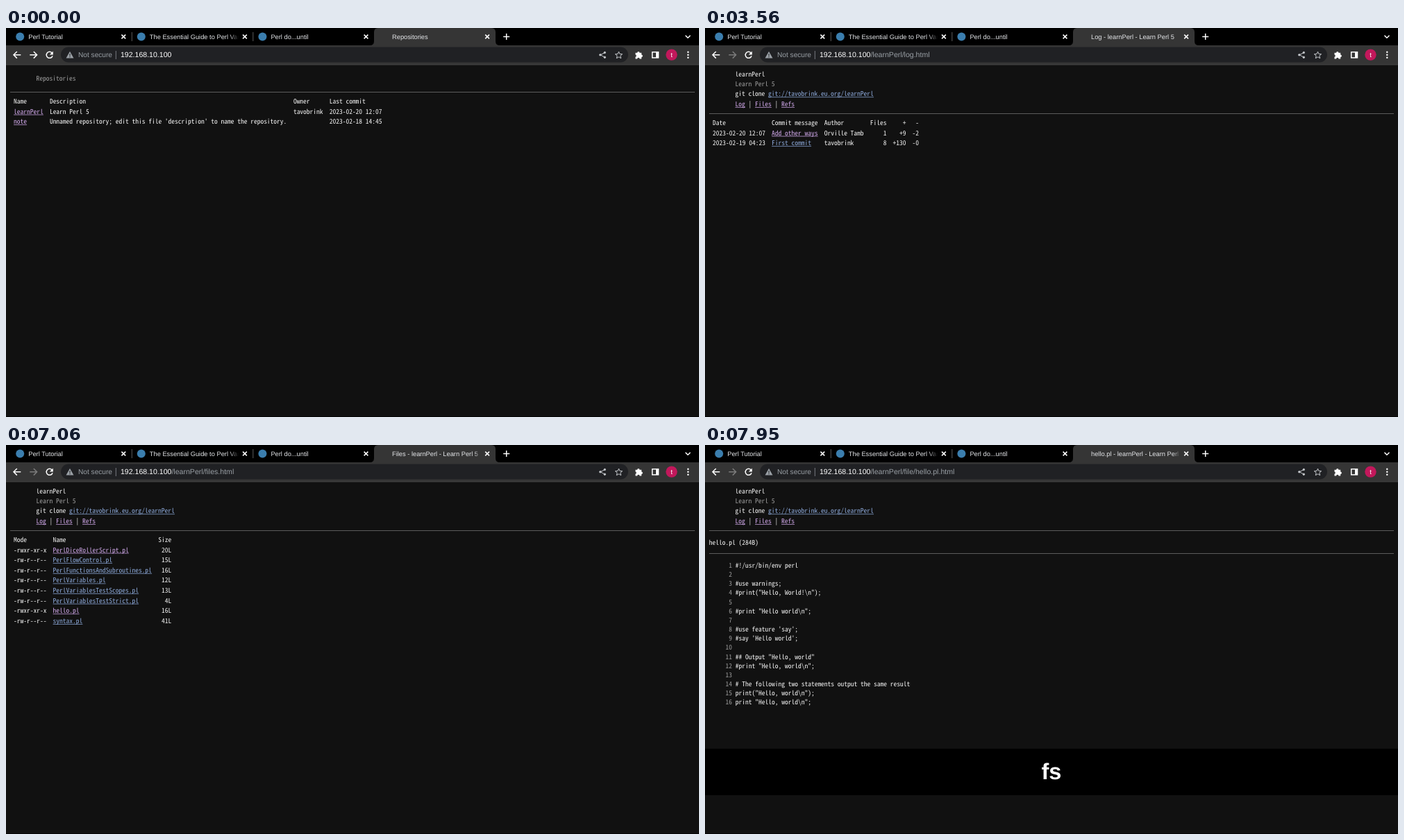
Recreate the animation shown at these times as an HTML page. Size 998x561 px, loop 9850 ms.

```html
<!DOCTYPE html>
<html lang="en">
<head>
<meta charset="utf-8">
<title>Link hints</title>
<style>
html, body { margin: 0; width: 100%; height: 100%; overflow: hidden; background: #000; }
svg { display: block; width: 100vw; height: 100vh; }
text { font-family: "Liberation Sans", Arial, sans-serif; fill: #fff; white-space: pre; text-rendering: geometricPrecision; }
.tab { font-size: 9.3px; fill: #e4e6e9; }
.url { font-size: 10.57px; }
.mono { font-family: "Noto Sans Mono CJK SC", "Noto Sans Mono CJK JP", "Noto Sans Mono", monospace; fill: #f5f5f5; }
.dim { fill: #9c9c9c; }
.link { fill: #8ca9da; }
.seen { fill: #d0a8ea; }
.hint { font-size: 8px; font-weight: bold; fill: #302505; text-anchor: middle; }
.keys { font-size: 32.5px; font-weight: bold; text-anchor: middle; }
.icon { fill: none; stroke: #fff; stroke-width: 1.5; }
</style>
</head>
<body>
<svg id="stage" viewBox="0 0 998 561">
  <defs>
    <linearGradient id="gold" x2="0" y2="1">
      <stop stop-color="#fff785"/><stop offset="1" stop-color="#ffc542"/>
    </linearGradient>
    <linearGradient id="fade1" gradientUnits="userSpaceOnUse" x1="322" x2="335">
      <stop stop-color="#e4e6e9"/><stop offset="1" stop-color="#e4e6e9" stop-opacity="0"/>
    </linearGradient>
    <linearGradient id="fade2" gradientUnits="userSpaceOnUse" x1="675" x2="684">
      <stop stop-color="#e4e6e9"/><stop offset="1" stop-color="#e4e6e9" stop-opacity="0"/>
    </linearGradient>
  </defs>
  <rect width="998" height="561"/>
  <rect y="25" width="998" height="28" fill="#353535"/>
  <path d="M524 25q6 0 6-6V6q0-6 6-6h163q6 0 6 6v13q0 6 6 6z" fill="#353535"/>
  <path d="M181.3 6v13M355.8 6v13" stroke="#5a5a5a"/>
  <g id="tabs"></g>
  <path class="icon" d="M716.2 12.5h9M720.7 8v9M978.5 10.8l3.5 3.4 3.5-3.4"/>
  <rect x="79" y="27.5" width="817" height="22" rx="11" fill="#202124"/>
  <path class="icon" d="M21.3 38.8H11M15.8 34l-4.8 4.8 4.8 4.8"/>
  <path class="icon" id="forward" d="M34.3 38.8h10.3M39.8 34l4.8 4.8-4.8 4.8"/>
  <path class="icon" d="M66.2 36a4.5 4.5 0 1 0 .8 4.2"/>
  <path d="M67.8 33.4v5h-5z" fill="#fff"/>
  <path d="M92 33.8l5.5 9.6h-11z" fill="#9aa0a6"/>
  <path d="M92 37.2v3M92 41v1.2" stroke="#202124" stroke-width="1.1"/>
  <text x="104" y="42.3" font-size="10.13" style="fill:#9aa0a6">Not secure</text>
  <path d="M158.3 33v12" stroke="#777b80"/>
  <text class="url" x="165" y="42.4">192.168.10.100<tspan id="path" fill="#9aa0a6"></tspan></text>
  <g fill="#c7cace" stroke="#c7cace">
    <path d="M862.3 35.6l-6.3 3.2 6.3 3.4" fill="none"/>
    <circle cx="862.3" cy="35.4" r="1.2"/><circle cx="855.8" cy="38.8" r="1.2"/><circle cx="862.3" cy="42.3" r="1.2"/>
  </g>
  <path d="M882.5 34l1.4 3.4 3.7.3-2.8 2.4.9 3.6-3.2-1.9-3.2 1.9.9-3.6-2.8-2.4 3.7-.3z" fill="none" stroke="#c7cace"/>
  <path d="M906.5 35.8h2.6a1.7 1.7 0 0 1 3.4 0h2.7v2.7a1.7 1.7 0 0 1 0 3.4v2.6h-2.7a1.7 1.7 0 0 0-3.4 0h-2.6v-2.7a1.7 1.7 0 0 0 0-3.3z" fill="#fff"/>
  <rect class="icon" x="930.7" y="34.7" width="8.8" height="8.2"/>
  <rect x="936" y="34.7" width="4" height="8.2" fill="#fff"/>
  <circle cx="958.5" cy="38.6" r="8.2" fill="#c2185b"/>
  <text x="958.5" y="41.7" font-size="9.5" text-anchor="middle">t</text>
  <g fill="#fff"><circle cx="982.3" cy="34.8" r="1.2"/><circle cx="982.3" cy="38.8" r="1.2"/><circle cx="982.3" cy="42.8" r="1.2"/></g>
  <rect y="53" width="998" height="507.3" fill="#111"/>
  <rect y="52.6" width="998" height=".8" fill="#4b4b4b"/>
  <g id="pages"></g>
  <g id="hud">
    <rect x="660.5" y="538.4" width="315" height="30" rx="3" fill="#202124" stroke="#4a4b4e" stroke-width=".7"/>
    <text x="666" y="553" font-size="10.2">Open link in current tab</text>
  </g>
  <g id="band">
    <rect y="438" width="998" height="67"/>
    <text class="keys" id="keys" x="499" y="482"></text>
    <rect id="recent" y="489" height="2" fill="#fff"/>
  </g>
</svg>
<script>
const LOOP = 9850;
const SCALE = 998 / 1366;
const CHAR = 6.5 * SCALE;
const ROW = 20 * SCALE;
const CODE_ROW = 18 * SCALE;
const $ = id => document.getElementById(id);

function add(parent, tag, attrs, content) {
  const node = document.createElementNS("http://www.w3.org/2000/svg", tag);
  for (const name in attrs) node.setAttribute(name, attrs[name]);
  if (content !== undefined) node.textContent = content;
  return parent.appendChild(node);
}

// Pick the monospaced font size that gives the wanted advance.
const probe = add($("stage"), "text", { class: "mono", "font-size": 100 }, "0000000000");
const monoSize = CHAR * 1000 / probe.getComputedTextLength();
probe.remove();

function mono(group, x, middle, text, kind = "", right = false) {
  if (right) x -= text.length * CHAR;
  add(group, "text", { class: "mono " + kind, x, y: middle + 3.5, "font-size": monoSize }, text);
}

function link(group, x, middle, text, kind = "seen") {
  mono(group, x, middle, text, kind);
  add(group, "rect", { class: kind, x, y: middle + 4.6, width: text.length * CHAR, height: SCALE });
  group.links.push([x, middle - 6]);
}

const rule = (group, y) => add(group, "rect", { x: 6, y, width: 986, height: 1, fill: "#5c5c5c" });

function repoHeader(group) {
  const left = 43.54;
  group.links.push([11, 67]);
  mono(group, left, 66.9, "learnPerl");
  mono(group, left, 80.1, "Learn Perl 5", "dim");
  mono(group, left, 94.8, "git clone");
  link(group, left + 10 * CHAR, 94.8, "git://tavobrink.eu.org/learnPerl", "link");
  link(group, left, 109.4, "Log");
  mono(group, left + 4 * CHAR, 109.4, "|");
  link(group, left + 6 * CHAR, 109.4, "Files");
  mono(group, left + 12 * CHAR, 109.4, "|");
  link(group, left + 14 * CHAR, 109.4, "Refs");
  rule(group, 123);
}

function indexPage(g) {
  mono(g, 43.54, 72, "Repositories", "dim");
  rule(g, 92);
  const columns = [11.1, 62.9, 413.9, 465.7];
  [["Name", "Description", "Owner", "Last commit"],
   ["learnPerl", "Learn Perl 5", "tavobrink", "2023-02-20 12:07"],
   ["note", "Unnamed repository; edit this file 'description' to name the repository.", "", "2023-02-18 14:45"]
  ].forEach((row, r) => row.forEach((cell, c) =>
    (r && !c ? link : mono)(g, columns[c], 105.5 + ROW * r, cell)));
}

function logPage(g) {
  repoHeader(g);
  const columns = [11.1, 96.1, 171.7, 261.5, 289.5, 308.1];
  [["Date", "Commit message", "Author", "Files", "+", "-"],
   ["2023-02-20 12:07", "Add other ways", "Orville Tamb", "1", "+9", "-2"],
   ["2023-02-19 04:23", "First commit", "tavobrink", "8", "+130", "-0"]
  ].forEach((row, r) => row.forEach((cell, c) => {
    const y = 136.5 + ROW * r;
    if (r && c === 1) link(g, columns[c], y, cell, r === 1 ? "seen" : "link");
    else mono(g, columns[c], y, cell, "", c > 2);
  }));
}

function filesPage(g) {
  repoHeader(g);
  mono(g, 11.1, 136.5, "Mode");
  mono(g, 67.6, 136.5, "Name");
  mono(g, 238.2, 136.5, "Size", "", true);
  [["PerlDiceRollerScript", 20, true], ["PerlFlowControl", 15], ["PerlFunctionsAndSubroutines", 16],
   ["PerlVariables", 12], ["PerlVariablesTestScopes", 13], ["PerlVariablesTestStrict", 4],
   ["hello", 16, true], ["syntax", 41]
  ].forEach(([name, lines, run], i) => {
    const y = 136.5 + ROW * (i + 1);
    mono(g, 11.1, y, run ? "-rwxr-xr-x" : "-rw-r--r--");
    link(g, 67.6, y, name + ".pl", run ? "seen" : "link");
    mono(g, 238.2, y, lines + "L", "", true);
  });
}

function sourcePage(g) {
  repoHeader(g);
  mono(g, 5.85, 140, "hello.pl (284B)");
  rule(g, 156);
  String.raw`#!/usr/bin/env perl

#use warnings;
#print("Hello, World!\n");

#print "Hello world\n";

#use feature 'say';
#say 'Hello world';

## Output "Hello, world"
#print "Hello, world\n";

# The following two statements output the same result
print("Hello, world\n");
print "Hello, world\n";`.split("\n").forEach((line, i) => {
    const y = 173.5 + CODE_ROW * i;
    mono(g, 39.1, y, String(i + 1), "dim", true);
    mono(g, 43.84, y, line);
  });
}

function addHints(page) {
  const letters = [..."sadfjklewcmpgh"].slice(0, page.links.length).sort();
  const hints = add(page, "g", {});
  page.links.forEach(([x, y], i) => {
    add(hints, "rect", { x: x + 0.4, y: y + 0.4, width: 11.6, height: 10, rx: 2, fill: "url(#gold)", stroke: "#c38a22", "stroke-width": 0.7 });
    add(hints, "text", { class: "hint", x: x + 6.2, y: y + 8.3 }, letters[i].toUpperCase());
  });
  return hints;
}

const pages = [
  [indexPage, "Repositories", ""],
  [logPage, "Log - learnPerl - Learn Perl 5", "/learnPerl/log.html"],
  [filesPage, "Files - learnPerl - Learn Perl 5", "/learnPerl/files.html"],
  [sourcePage, "hello.pl - learnPerl - Learn Perl 5", "/learnPerl/file/hello.pl.html"]
].map(([draw, title, path]) => {
  const group = add($("pages"), "g", {});
  group.links = [];
  draw(group);
  return { group, title, path, hints: addHints(group) };
});

const tabTitles = ["Perl Tutorial", "The Essential Guide to Perl Vari", "Perl do...until", ""].map((title, i) => {
  const x = 20.2 + 174.6 * i;
  if (i < 3) add($("tabs"), "circle", { cx: x, cy: 12.5, r: 6, fill: "#3b7eae" });
  add($("tabs"), "path", { class: "icon", d: `M${x + 146.2} 9.6l5.8 5.8m0-5.8l-5.8 5.8` });
  const text = add($("tabs"), "text", { class: "tab", x: x + 12, y: 15.6 }, title);
  if (i % 2) text.style.fill = `url(#fade${(i + 1) / 2})`;
  return text;
});

// time, page, keys shown, last key underlined, hints shown, message opacity
const steps = [
  [0, 0, "", 0, 0, 0],
  [370, 0, "f", 1, 0, 0],
  [420, 0, "f", 1, 1, 0.35],
  [480, 0, "f", 0, 1, 0.75],
  [540, 0, "f", 0, 1, 1],
  [860, 0, "fa", 1, 1, 1],
  [910, 0, "fa", 1, 0, 0],
  [970, 1, "fa", 0, 0, 0],
  [3560, 1, "", 0, 0, 0],
  [3900, 1, "f", 1, 0, 0],
  [3950, 1, "f", 1, 1, 0.3],
  [4000, 1, "f", 0, 1, 0.6],
  [4050, 1, "f", 0, 1, 0.9],
  [4100, 1, "f", 0, 1, 1],
  [4370, 1, "fj", 1, 1, 1],
  [4420, 1, "fj", 1, 0, 0],
  [4480, 2, "fj", 0, 0, 0],
  [7060, 2, "", 0, 0, 0],
  [7270, 2, "f", 1, 0, 0],
  [7320, 2, "f", 1, 1, 0.3],
  [7380, 2, "f", 0, 1, 0.6],
  [7430, 2, "f", 0, 1, 0.9],
  [7490, 2, "f", 0, 1, 1],
  [7750, 2, "fs", 1, 1, 1],
  [7800, 2, "fs", 1, 0, 0],
  [7860, 3, "fs", 0, 0, 0]
];

const show = (node, on) => { node.style.display = on ? "" : "none"; };

function render([, pageIndex, keys, recent, hints, message]) {
  const page = pages[pageIndex];
  pages.forEach(p => show(p.group, p === page));
  show(page.hints, hints);
  tabTitles[3].textContent = page.title;
  $("path").textContent = page.path;
  $("forward").style.stroke = pageIndex ? "#7c7c7c" : "#fff";
  $("hud").style.opacity = message;
  show($("band"), keys);
  $("keys").textContent = keys;
  show($("recent"), recent);
  if (recent) {
    const last = keys.length - 1;
    const left = $("keys").getStartPositionOfChar(last).x;
    $("recent").setAttribute("x", left);
    $("recent").setAttribute("width", $("keys").getEndPositionOfChar(last).x - left);
  }
}

const start = performance.now();
let current;
function tick() {
  const time = (performance.now() - start) % LOOP;
  const step = steps.findLast(s => s[0] <= time) || steps[0];
  if (step !== current) render(current = step);
  requestAnimationFrame(tick);
}
tick();
</script>
</body>
</html>
```
